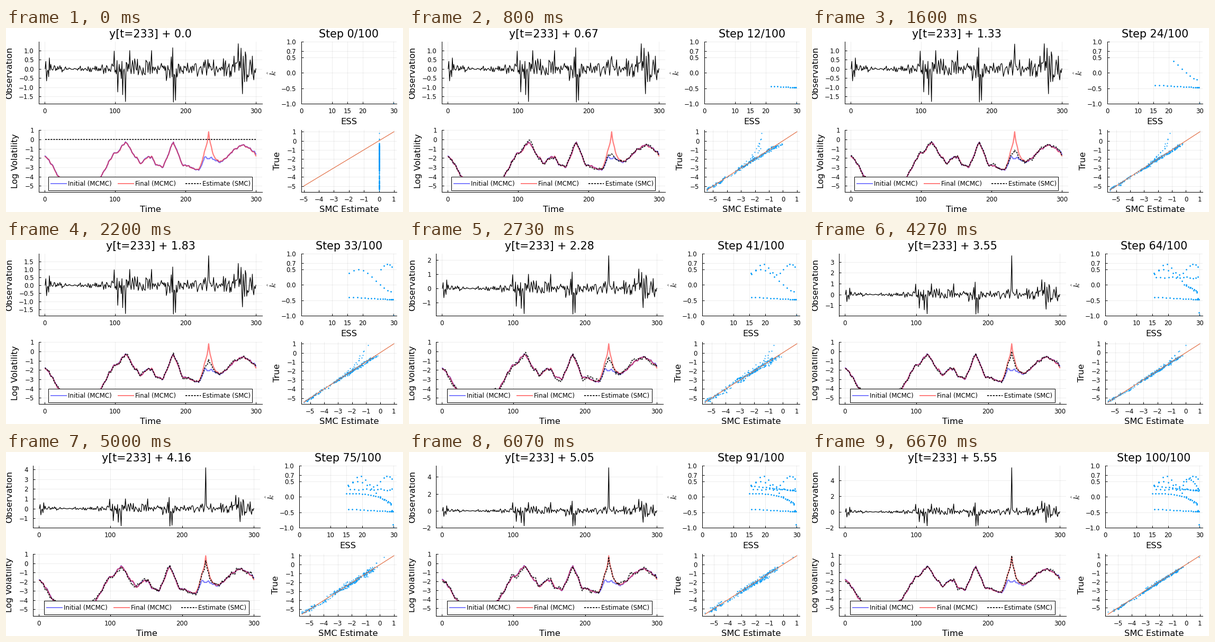
A matplotlib script that plays this animation: 750x350 px, repeating every 6740 ms.

```python
import numpy as np
import matplotlib.pyplot as plt
from matplotlib.animation import FuncAnimation
from matplotlib.patches import Rectangle
from matplotlib.ticker import FuncFormatter

W, H, DPI = 750, 350, 100
LAST, LOOP_MS = 100, 6740
FRAMES = 2 * (LAST + 1)
PX = 72 / DPI
BLUE, ORANGE = "#009af9", "#e26f46"
TICK, GUIDE, TITLE = 11.8 * PX, 16.3 * PX, 20.7 * PX
DASH = (0, (1.65, 1.05))

plt.rcParams["font.family"] = "DejaVu Sans"
plt.rcParams["mathtext.fontset"] = "cm"

rng = np.random.default_rng(233)
t = np.arange(1, 301)


def smooth(width, amp):
    raw = rng.normal(size=t.size + width - 1)
    return amp * np.convolve(raw, np.ones(width) / np.sqrt(width), "valid")


# Log volatility: a jittered course, and the same with a sharp peak at t = 233
knots = [(1, -2), (7, -2.2), (18, -3.9), (38, -5.35), (70, -4.6), (80, -4),
         (91, -2.4), (98, -1.6), (104, -1.4), (115, -.2), (126, -1.6),
         (136, -2.5), (152, -1.7), (158, -2.7), (168, -3), (183, -.2),
         (196, -2.75), (219, -3.3), (227, -2), (236, -2), (249, -2.5),
         (277, -.65), (287, -.7), (300, -1.45)]
first = np.interp(t, *zip(*knots)) + smooth(3, .065)
first[37] = -5.47
bump = np.exp(-np.abs(t - 233) / 4)
bump *= .83 - first[232]
final = first + bump - .2 * np.clip((t - 292) / 8, 0, 1)
first = first + smooth(4, .03)

# Observations: volatility-scaled noise and the largest swings
obs = np.clip(rng.normal(size=300) * np.exp(first / 2) * .7, -.7, .7)
swings = {3: -.65, 7: .6, 99: .97, 104: -1.25, 111: -1.4, 115: -1.77, 121: 1,
          152: 1, 182: 1.15, 183: -1.805, 186: -1.7, 233: .02, 275: 1.37,
          279: 1.13, 281: -1.35, 285: .93}
for pos, val in swings.items():
    obs[pos - 1] = val


def run(n, low, power, khat):
    """Sample size falling from 30 to low over n steps, with its k-hat."""
    d = (np.arange(1, n + 1) / n) ** power
    return np.column_stack([30 - (30 - low) * d, khat(d)])


runs = [
    run(17, 15.6, 1.6, lambda d: -.47 + .08 * d),
    run(11, 15.5, 1.2, lambda d: -.22 + .72 * np.sin(2 * d) ** 2),
    run(13, 15.6, 1.3, lambda d: .5 + .17 * np.cos(10.5 * (d - .14))),
    run(13, 16.2, 1.3, lambda d: .24 + .02 * np.cos(20 * d)),
    run(21, 15, 1.5, lambda d: .11 - .36 * (1 - d) ** 3 - 1.2 * np.exp(-60 * d)),
    run(16, 15.5, 1.4, lambda d: .2 + .16 * d),
    run(9, 25, 1.5, lambda d: .2 + .38 * np.sin(2.2 * d)),
]
track = np.vstack([[(30, -1)]] + runs)
starts = np.cumsum([1] + [len(r) for r in runs])
starts[-1] += 11
noise = [(smooth(4, .08), smooth(5, .16)) for _ in runs]


def estimate(i):
    if i == 0:
        return np.zeros(t.size)
    j = np.searchsorted(starts, i, side="right") - 1
    u = (i - starts[j]) / (starts[j + 1] - starts[j])
    s = i / LAST
    mix = 1.03 * s ** .82
    low = -5.45 - .3 * s ** 4
    est = first + mix * (final - first) + (1 - u) * noise[j][0] + u * noise[j][1]
    est = np.maximum(est, low)
    est[232] = first[232] + mix * (final - first)[232]
    est[37] = low
    return est


def padded(lo, hi):
    pad = .03 * (hi - lo)
    return lo - pad, hi + pad


def number(digits):
    return FuncFormatter(lambda v, _: f"{v:.{digits}f}".replace("-", "\u2212"))


fig = plt.figure(figsize=(W / DPI, H / DPI), dpi=DPI, facecolor="white")


def panel():
    ax = fig.add_axes([.1, .1, .1, .1])
    ax.spines[["top", "right"]].set_visible(False)
    ax.spines[["left", "bottom"]].set_linewidth(PX)
    ax.patch.set_visible(False)
    ax.set_axisbelow(True)
    ax.grid(color="black", alpha=.1, lw=.7 * PX)
    ax.tick_params(direction="in", length=4 * PX, width=PX, labelsize=TICK)
    ax.tick_params(axis="x", pad=8 * PX)
    ax.tick_params(axis="y", pad=9.3 * PX)
    ax.xaxis.set_major_formatter(number(0))
    ax.yaxis.set_major_formatter(number(0))
    return ax


obs_ax, k_ax, vol_ax, fit_ax = [panel() for _ in range(4)]
for ax in (obs_ax, vol_ax):
    ax.set_xlim(*padded(1, 300))
    ax.set_xticks([0, 100, 200, 300])
k_ax.set(xlim=(0, 31), ylim=(-1, 1), xticks=[0, 10, 15, 20, 30],
         yticks=[-1, -.5, 0, .5, .7, 1])
k_ax.yaxis.set_major_formatter(number(1))
vol_ax.set_yticks(range(-5, 2))
fit_ax.set_xticks(range(-5, 2))
fit_ax.set_yticks(range(-5, 2))

obs_line, = obs_ax.plot([], [], color="black", lw=1.2 * PX)
vol_ax.plot(t, first, color=(0, 0, 1, .5), lw=2.2 * PX)
vol_ax.plot(t, final, color=(1, 0, 0, .5), lw=2.2 * PX)
est_line, = vol_ax.plot([], [], color="black", alpha=.85, lw=1.9 * PX, ls=DASH,
                        dash_capstyle="butt")
k_dots, = k_ax.plot([], [], "o", color=BLUE, ms=2.8 * PX, mew=0)
fit_dots, = fit_ax.plot([], [], "o", color=BLUE, ms=2 * PX, mew=0)
ref_line, = fit_ax.plot([], [], color=ORANGE, lw=1.2 * PX)

# Overlay in pixels for labels and legend
top = fig.add_axes([0, 0, 1, 1], zorder=5)
top.set(xlim=(0, W), ylim=(H, 0))
top.axis("off")


def label(text, y, size, **kw):
    style = dict(ha="center", va="baseline", fontsize=size)
    style.update(kw)
    return top.text(0, y, text, **style)


def upright(text, y):
    return label(text, y, GUIDE, rotation=90, rotation_mode="anchor")


obs_title = label("", 18.5, TITLE)
step_title = label("", 18.5, TITLE)
ess_text = label("ESS", 183, GUIDE)
time_text = label("Time", 350.5, GUIDE)
smc_text = label("SMC Estimate", 350.5, GUIDE)
obs_text = upright("Observation", 85.5)
vol_text = upright("Log Volatility", 253)
true_text = upright("True", 253)
k_text = label(r"$\hat{k}$", 85.5, GUIDE, rotation=90, va="center")

box = Rectangle((0, 282.5), 1, 26, fc="white", ec="black", lw=PX)
top.add_patch(box)
entries = []
for name, color, dash in [("Initial (MCMC)", (0, 0, 1, .5), "-"),
                          ("Final (MCMC)", (1, 0, 0, .5), "-"),
                          ("Estimate (SMC)", (0, 0, 0, .85), DASH)]:
    key, = top.plot([], [], color=color, ls=dash, lw=2 * PX, dash_capstyle="butt")
    entries.append((key, label(name, 300, TICK, ha="left")))


def place(ax, left, right, upper, lower):
    ax.set_position([left / W, 1 - lower / H, (right - left) / W, (lower - upper) / H])


def layout(wide, signed):
    l0, l1, r0, r1 = (62, 484, 557.5, 738) if wide else (51, 480.2, 554, 738)
    place(obs_ax, l0, l1, 26.5, 144.5)
    place(vol_ax, l0, l1, 194, 312)
    place(k_ax, r0, r1, 26.5, 144.5)
    place(fit_ax, r0, r1, 194, 312)
    for text in (obs_title, time_text):
        text.set_x((l0 + l1) / 2)
    for text in (step_title, ess_text, smc_text):
        text.set_x((r0 + r1) / 2)
    vol_text.set_x(l0 - 40)
    obs_text.set_x(l0 - 51 if wide else l0 - 40 if signed else l0 - 30)
    true_text.set_x(r0 - 40.5)
    k_text.set_x(r0 - 54)
    x0, x1, pitch = (80, 465, 127) if wide else (72, 459, 127.3)
    box.set_x(x0)
    box.set_width(x1 - x0)
    for n, (key, text) in enumerate(entries):
        x = x0 + 4.5 + n * pitch
        key.set_data([x, x + 29], [295.5, 295.5])
        text.set_x(x + 32.3)


def draw(frame):
    i = min((frame + 1) // 2, LAST)
    shift = i * .0555
    y = obs.copy()
    y[232] += shift
    lo, hi = padded(y.min(), y.max())
    gap = .5 if i < 35 else 1 if i < 81 else 2
    ticks = np.arange(np.ceil(lo / gap), np.floor(hi / gap) + 1) * gap + 0.0
    obs_ax.set_ylim(lo, hi)
    obs_ax.set_yticks(ticks)
    obs_ax.yaxis.set_major_formatter(number(1 if gap < 1 else 0))
    obs_line.set_data(t, y)
    layout(gap < 1, ticks[0] < 0)

    est = estimate(i)
    est_line.set_data(t, est)
    vol_ax.set_ylim(*padded(min(est.min(), final.min(), first.min()),
                            max(est.max(), final.max())))
    start = min(-5, est.min())
    fit_dots.set_data(est, final)
    ref_line.set_data([start, 1], [start, 1])
    fit_ax.set_xlim(*padded(start, 1))
    fit_ax.set_ylim(*padded(min(start, final.min()), 1))

    k_dots.set_data(track[:i + 1, 0], track[:i + 1, 1])
    obs_title.set_text(f"y[t=233] + {round(shift, 2)}")
    step_title.set_text(f"Step {i}/{LAST}")
    return []


anim = FuncAnimation(fig, draw, frames=FRAMES, init_func=lambda: draw(0),
                     interval=LOOP_MS / FRAMES, repeat=True, repeat_delay=0, blit=False)
plt.show()
```
